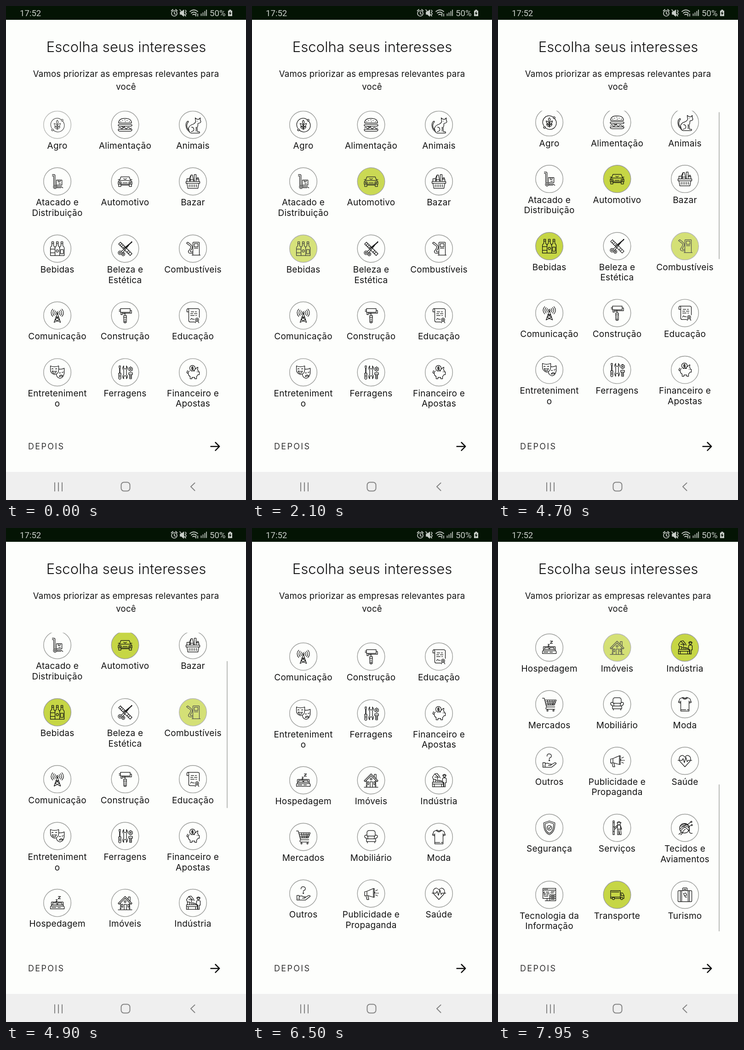
These frames come from a looping animation (522x1073 px, 8000 ms). An HTML page:

```html
<!DOCTYPE html>
<html lang="pt-BR">
<head>
<meta charset="utf-8">
<title>Escolha seus interesses</title>
<style>
html, body { margin: 0; width: 100%; height: 100%; overflow: hidden; background: #fdfefc; }
svg { display: block; }
text { font-family: Inter, "Open Sans", sans-serif; fill: #111; }
.title { font-size: 31px; font-weight: 300; letter-spacing: .1px; }
.sub { font-size: 18.6px; letter-spacing: .2px; }
.label { font-size: 19px; letter-spacing: .25px; }
.later { font-size: 18px; letter-spacing: 2.3px; fill: #333; }
.status { font: 18.6px Roboto, sans-serif; fill: #c9cec9; }
.mid { text-anchor: middle; }
.line { fill: none; stroke-linecap: round; stroke-linejoin: round; }
.icon { stroke: #111; stroke-width: 1.25; }
.ring { stroke: #9b9d9a; stroke-width: 1.4; }
</style>
</head>
<body>
<svg width="522" height="1073" viewBox="0 0 522 1073">
  <defs><clipPath id="view"><rect y="227.5" width="522" height="661"/></clipPath></defs>
  <rect width="522" height="1073" fill="#fdfefc"/>

  <rect width="522" height="30" fill="#041404"/>
  <text class="status" x="30" y="22">17:52</text>
  <text class="status" x="443" y="22">50%</text>
  <g class="line" stroke="#c9cec9" stroke-width="1.7">
    <circle cx="366" cy="16" r="6"/>
    <path d="M366 12.5v4l2.5 1.5M359.5 10.5l3.5-3M372.5 10.5l-3.5-3"/>
    <path d="M379 13h3l4.5-4v13l-4.5-4h-3z" fill="#c9cec9"/>
    <path d="M378 8l13 14M390 9l2 2-2 3 2 3-2 3"/>
    <path d="M400 12q8.500-7 17 0M403 15.500q5.500-4.500 11 0M406 19q2.500-2 5 0M413 17v5M417 17v5"/>
    <path d="M424.500 17v4M428.500 14.500v6.500M432.500 11.500v9.500M436 8.500v12.500"/>
  </g>
  <path d="M483 10h2.500v-2h4v2h2.500v12h-9z" fill="#c9cec9"/>
  <path d="M488.500 11l-4 5.500h2.500l-.5 4 4-5.500h-2.500z" fill="#041404"/>

  <text class="title mid" x="261.500" y="99.500">Escolha seus interesses</text>
  <text class="sub mid" x="261" y="154">Vamos priorizar as empresas relevantes para</text>
  <text class="sub mid" x="261" y="181.500">você</text>

  <g clip-path="url(#view)">
    <g id="list"></g>
    <rect id="bar" x="480" width="2" height="319" fill="#b9bbb8"/>
  </g>

  <text class="later" x="48" y="963">DEPOIS</text>
  <path class="line" d="M445.500 956.700h18M455.500 948l8.700 8.700-8.700 8.700" stroke="#111" stroke-width="2.500"/>

  <rect y="1012" width="522" height="61" fill="#efefef"/>
  <g class="line" stroke="#858585" stroke-width="2">
    <path d="M106 1035.500v18M114 1035.500v18M122 1035.500v18M410.500 1036l-8.500 8 8.500 8.500"/>
    <rect x="250.500" y="1034.500" width="19" height="19" rx="6"/>
  </g>
</svg>
<script>
const circle = (x, y, r) => `M${x - r} ${y}a${r} ${r} 0 1 0 ${2 * r} 0a${r} ${r} 0 1 0 ${-2 * r} 0`;
const box = (x, y, w, h) => `M${x} ${y}h${w}v${h}h${-w}z`;
const bottle = x => `M${x - 2}-15h4v9q3 2 3 5V15h-10V-1q0-3 3-5zM${x - 2}-11h4`;

// Label and icon path, centred on its ring
const items = [
  ["Agro", "M-12 7.500A14 14 0 0 1 8-11.500M12-7.500A14 14 0 0 1-8 12M0 11V-1M0-10Q-4-6 0-1Q4-6 0-10M0 4Q-6 4-7-3Q-1-2 0 4Q1-2 7-3Q6 4 0 4M0 9Q-5 9-6 4Q-1 4 0 9Q1 4 6 4Q5 9 0 9" + circle(10.5, -10, 2) + circle(-10.5, 11, 2)],
  ["Alimentação", "M-14-4Q-14-14 0-14Q14-14 14-4zM-6-9h1M-1-11h1M4-9h1M9-7h1M-10-7h1M0-7h1M-12-1H12Q15-1 15 1T12 3H-12Q-15 3-15 1T-12-1M-8 3l4 3 4-3M-14 7q2.300-3 4.700 0t4.700 0t4.700 0t4.700 0t4.700 0t4.500 0M-15 10H15Q15 14 11 14H-11Q-15 14-15 10"],
  ["Animais", "M6-7L5-15l4 3h4l3-3v5q3 4-1 6l-4 1q0 7-2 9l1 9h4q2 3-1 3H-4Q-12 15-9 6Q-7 1 0-1Q5-3 6-7M-8 11Q-14 8-13 0Q-12-4-10-6Q-9-8-11-8Q-16-5-15 3Q-14 12-7 14M-4 15Q3 14 2 9Q1 5-3 5M7 5v9M9-8h.5"],
  ["Atacado e|Distribuição", "M-11-15h4q2 0 2 2V8M-11-12h3V8M-1 11H8l4 3M-1 13.500H8M2-3v4h4v-4M3 5h4" + box(-2, -3, 12, 11) + circle(-5, 12, 3.5) + circle(-5, 12, 1)],
  ["Automotivo", "M-9-10H9L12-2H-12zM-12-2Q-15-1-15 2V6H15V2Q15-1 12-2M-14 6v5h5V6M14 6v5h-5V6M-13 1h4l1 3h-4zM13 1h-4l-1 3h4zM-5 3h10M-15-4h3M15-4h-3M-3-6q3 3 6 0M-9 8H9"],
  ["Bazar", "M-15 0H15V4H-15zM-13 4L-11 15H11L13 4M-8 7v5M-4 7v5M0 7v5M4 7v5M8 7v5M-13 0v-6h6v6M-8-6l4-8h3l3 14M-4-14L-6 0M3 0v-15h4V0M7-5h6V0M9-5v-3h3v3M-6-4h6"],
  ["Bebidas", bottle(-10) + bottle(0) + bottle(10) + "M-15 1h10M-15 9h10" + circle(0, 5, 2.5) + box(7, 2, 6, 9)],
  ["Beleza e|Estética", "M-14-10l4-4L15 11l-4 4zM-11-7l3-3M-8-4l3-3M-5-1l3-3M4 8l3-3M7 11l3-3M14-15L-5 9M15-14L-8 6M15-15L-2-1" + circle(-11, 9, 4) + circle(-11, 9, 1.5) + circle(-4, 12, 3.5) + circle(-4, 12, 1.2)],
  ["Combustíveis", "M0 14V-13q0-1 1-1H13q1 0 1 1V14zM-2 14H16M3-1h8M0 10h-4q-6 1-6-4Q-6 1-5-2Q-4-6-9-8l-5-4 3-2 5 4Q0-6-2 0Q-7 6-5 7H0" + box(3, -11, 8, 7)],
  ["Comunicação", "M0-5L-7 15M0-5L7 15M-3 3L5 9-7 15M3 3L-5 9 7 15M-2 3H2M-4-10Q-7-6-4-2M4-10Q7-6 4-2M-7-12Q-12-6-7 0M7-12Q12-6 7 0M-10-14Q-17-6-10 2M10-14Q17-6 10 2" + circle(0, -6, 2)],
  ["Construção", "M-13-12h3M-13-9h3M11-11h3v6H0V0M-9-7v5h3v-5M-4-7v3h3v-3M-3 4V13q0 3 3 3t3-3V4M0 7v3" + box(-10, -15, 21, 8) + box(-3, 0, 6, 4) + circle(0, 13, .8)],
  ["Educação", "M-13-8v-4q0-3 2-3H10q4 0 4 3V4M-13-8h4M-9-8v-4q0-3-2-3M-9-8V11q0 3 3 3H4M-4-8H2M5-8h3M-5-4H0M3-4h6M-5 0h8M6 0h2M-5 9q2-5 4-1h4M7 12l-2 4M11 12l2 4" + circle(9, 9, 3.5) + circle(9, 9, 1)],
  ["Entreteniment|o", "M-15-14Q-6-10 3-14V-5Q2 4-6 5Q-15 2-15-6zM-12-7q1.500-2 3 0M-4-7q1.500-2 3 0M-11-3q5 2 9 0q-1 5-4.500 5T-11-3M4-7Q10-6 15-9V2Q13 12 6 13Q-2 11-2 4M4 1q2 1 3 0M10 0q2 1 3-1M4 9q4-6 8-1z"],
  ["Ferragens", "M-13-14h3v3l-1 3V2h2v9q0 4-2.500 4T-14 11V2h2v-10l-1-3zM-11.500 5v6M-3-14v5l3 2 3-2v-5q4 5 0 9v10q4 4 0 9v-5l-3-2-3 2v5q-4-5 0-9v-10q-4-4 0-9M8-9l4-3 4 3v4l-4 3-4-3zM10 8h4M10 11h4" + circle(12, -7, 1.5) + box(8, 1, 8, 4) + box(10, 5, 4, 9)],
  ["Financeiro e|Apostas", "M-8-3Q-11 0-10 4Q-9 8-6 9v5h4v-3h6v3h4v-5q2-2 3-4h3v-6h-2Q12-4 10-6l1-5Q7-10 6-7M-4-3h8M-10 2q-4 0-3-3q2-1 1-3M9-1h.5M1-11q-4-1-4 1t2 1t2 2t-4 0M-1-13v8" + circle(-1, -9, 6)],
  ["Hospedagem", "M-3-7h3l-3 4h3M2-14h5l-5 5h5M-13 7V-1q0-1 1-1h24q1 0 1 1V7M-10 4v-4h9v4M1 4v-4h9v4M-15 13V9q0-2 2-2h26q2 0 2 2v4zM-12 10h9M1 10h6M-13 4h26"],
  ["Imóveis", "M-15 1L0-14 15 1 13 3 0-10-13 3zM-10 1V15M10 1V15M-15 15H15M7-8v-5h4v9M-11 12h3M8 12h3" + box(-2, 3, 5, 12) + box(-8, 3, 3, 6) + box(6, 3, 3, 6) + circle(0, -3, 2)],
  ["Indústria", "M-14 4H10V14H-14zM-14 8H10M-10 8v6M6 8v6M-12 4V-2h5v6M-7 0h5v4M-2 0h4v4M2 1h4v3M-12-2l-2-5 5-7 4 4 5 4M-9-14l5-1 5 6 2 4M-9-7h6v5M8-4q4-3 8 0V5h-2v9h-3V5h-3zM8-11h8" + circle(12, -10, 3)],
  ["Mercados", "M-15-13h4l5 19H12M-10-9H15L11 2H-7M-9-5H14M-8-1H12M-4-9l2 11M1-9l1 11M6-9V2M11-9L8 2M-6 6q-3 4 0 5H12" + circle(-4, 14, 1.5) + circle(9, 14, 1.5)],
  ["Mobiliário", "M-9-4V-9q0-5 5-5H4q5 0 5 5v5M-7 4V-2H7V4M-9 4H9M-7 0q-1-4-4-4-3 0-3 3 0 3 4 4v7h20V3q4-1 4-4 0-3-3-3-3 0-4 4M-8 10v3M8 10v3"],
  ["Moda", "M-4-15Q0-11 4-15L11-12 14-4 9-2V15H-9V-2L-14-4-11-12zM-6-14Q0-8 6-14M-9-2V-7M9-2V-7M-9 12H2M5 12h4M-13-6l4 2M13-6l-4 2"],
  ["Outros", "M-8 6q5-2 8 1h4q1 3-2 3h-4M3 9l9-5q3 0 3 2L5 14H-8M-12 11h.5M-5-10q0-5 4.500-5t5 4q0 4-4.500 5v2" + box(-14, 4, 5, 10) + circle(0, -1, 1)],
  ["Publicidade e|Propaganda", "M-14-4V5l5-1V-5zM-9-5L5-11M-9 4L5 8M5-11h2V8H5zM-11 5l2 8h4l-2-8M10-6l4-2M10-1h2M14-1h2M10 3l4 2M7-4q3 2 0 4"],
  ["Saúde", "M0 13L-11 1Q-14-4-11-9Q-5-15 0-8Q5-15 11-9Q14-4 11 1zM-15-1H-6l2-4 3 9 3-12 3 10 2-3H15"],
  ["Segurança", "M0-15L12-11Q13 9 0 15Q-13 9-12-11zM0-12L9-9Q10 7 0 12Q-10 7-9-9zM-2.500 0l2 2 3-4" + circle(0, 0, 5)],
  ["Serviços", "M-9-11h3M-9-2h3M-9 8h3M0-11h9M1-6h6l3 9h-3M1-6L-6 0M1-3L-5 3M1-6V15h3V5l2 10h3L7-6M1 3h6" + box(-9, -15, 3, 30) + circle(4, -10, 3.5)],
  ["Tecidos e|Aviamentos", "M-10-4Q0-5 8 6M-8-7Q4-6 10 2M-4-9Q5-8 10-2M-11 3Q-2-5 4-8M-9 7Q-5 0 1-2M-5 10Q-3 5 1 3M-13 14l6-5M-9 15l4-4M6-7l7-6M8-3l5-2M10 4q-2 9 6 8" + circle(-1, 1, 10.5) + circle(14, -13, 1.4) + circle(15, -6, 1.4)],
  ["Tecnologia da|Informação", "M-14-10H14M-11-12h1M-8-12h1M-5-12h1M-10-6h-2v3h3v3h-3M-7-6h6M-6-3H0M4-7h7M3-4h6M-6 0h4M-11 3h8M-14 8H2M-5 8v4M-9 13H2M4 2h7M4 6h7M4 10h7" + box(-14, -14, 28, 22) + box(1, 0, 13, 4) + box(1, 4, 13, 4) + box(1, 8, 13, 5)],
  ["Transporte", "M-14-9H7V8H-5M-14-9V8h3M-12-6H4M7-4h5l3 5v7h-2M7 8h1M9-2v4h5M-14 5H7" + circle(-8, 8, 2.5) + circle(10, 8, 2.5)],
  ["Turismo", "M-13-9H13q2 0 2 2V13q0 2-2 2H-13q-2 0-2-2V-7q0-2 2-2M-5-9V-13q0-2 2-2H3q2 0 2 2v4M-2-9v-3h4v3M-10-9V15M-7-9V15M7-9V15M10-9V15M-3-3l5-1 2 5-5 1zM0 2q0 4 4 3"]
];
const columns = [111.6, 259, 406.5];
const rows = [258, 381, 527, 672.3, 795.7, 941, 1064, 1187, 1332.5, 1478];

const LOOP = 8000, FADE = 400, DIM = .27;
// Tap time and item; the item stays dim until the next tap
const taps = [[-FADE, 0], [500, 4], [1850, 6], [3450, 8], [6500, 17], [7050, 16]];
const alwaysOn = 28;
// Time and scroll offset
const scrolls = [
  [4680, 0], [4750, 18], [4800, 48], [4900, 126], [5000, 198], [5100, 257], [5200, 305],
  [5300, 343], [5400, 373], [5500, 393], [7560, 393], [7600, 408], [7650, 443],
  [7700, 495], [7750, 548], [7800, 594], [7850, 632], [7900, 660], [7950, 681], [8000, 694]
];

const clamp = v => Math.min(1, Math.max(0, v));
const ease = v => v * v * (3 - 2 * v);
const list = document.getElementById("list");
const bar = document.getElementById("bar");

function add(parent, tag, attrs, text = "") {
  const el = document.createElementNS("http://www.w3.org/2000/svg", tag);
  for (const key in attrs) el.setAttribute(key, attrs[key]);
  el.textContent = text;
  return parent.appendChild(el);
}

const buttons = items.map(([label, icon], i) => {
  const x = columns[i % 3], y = rows[Math.floor(i / 3)];
  const face = add(list, "g", { transform: `translate(${x} ${y})` });
  add(face, "circle", { r: 29.8, fill: "#fdfefc" });
  const fill = add(face, "circle", { r: 29.8, fill: "#c6d645", opacity: i === alwaysOn ? 1 : 0 });
  add(face, "circle", { r: 29.8, class: "line ring" });
  add(face, "path", { d: icon, class: "line icon" });
  label.split("|").forEach((line, n) =>
    add(list, "text", { class: "label mid", x, y: y + 52 + n * 22.7 }, line));
  return { face, fill };
});

function scrollAt(t) {
  const next = scrolls.findIndex(([time]) => time > t);
  if (next <= 0) return 0;
  const [t0, y0] = scrolls[next - 1], [t1, y1] = scrolls[next];
  return y0 + (y1 - y0) * (t - t0) / (t1 - t0);
}

function barAlpha(t) {
  if (t >= 7450) return clamp((t - 7450) / 50);
  return t < 4680 ? 0 : 1 - clamp((t - 5780) / 270);
}

function draw(t) {
  const y = scrollAt(t);
  list.setAttribute("transform", `translate(0 ${-y})`);
  bar.setAttribute("y", 228 + y * .483);
  bar.setAttribute("opacity", barAlpha(t));
  taps.forEach(([start, item], k) => {
    const press = ease(clamp((t - start) / FADE));
    const release = taps[k + 1] ? ease(clamp((t - taps[k + 1][0]) / FADE)) : 0;
    const { face, fill } = buttons[item];
    face.setAttribute("opacity", 1 - DIM * (press - release));
    if (k) fill.setAttribute("opacity", clamp((t - start - 80) / 200));
  });
}

const begin = performance.now();
function tick() {
  draw((performance.now() - begin) % LOOP);
  requestAnimationFrame(tick);
}
tick();
</script>
</body>
</html>
```
